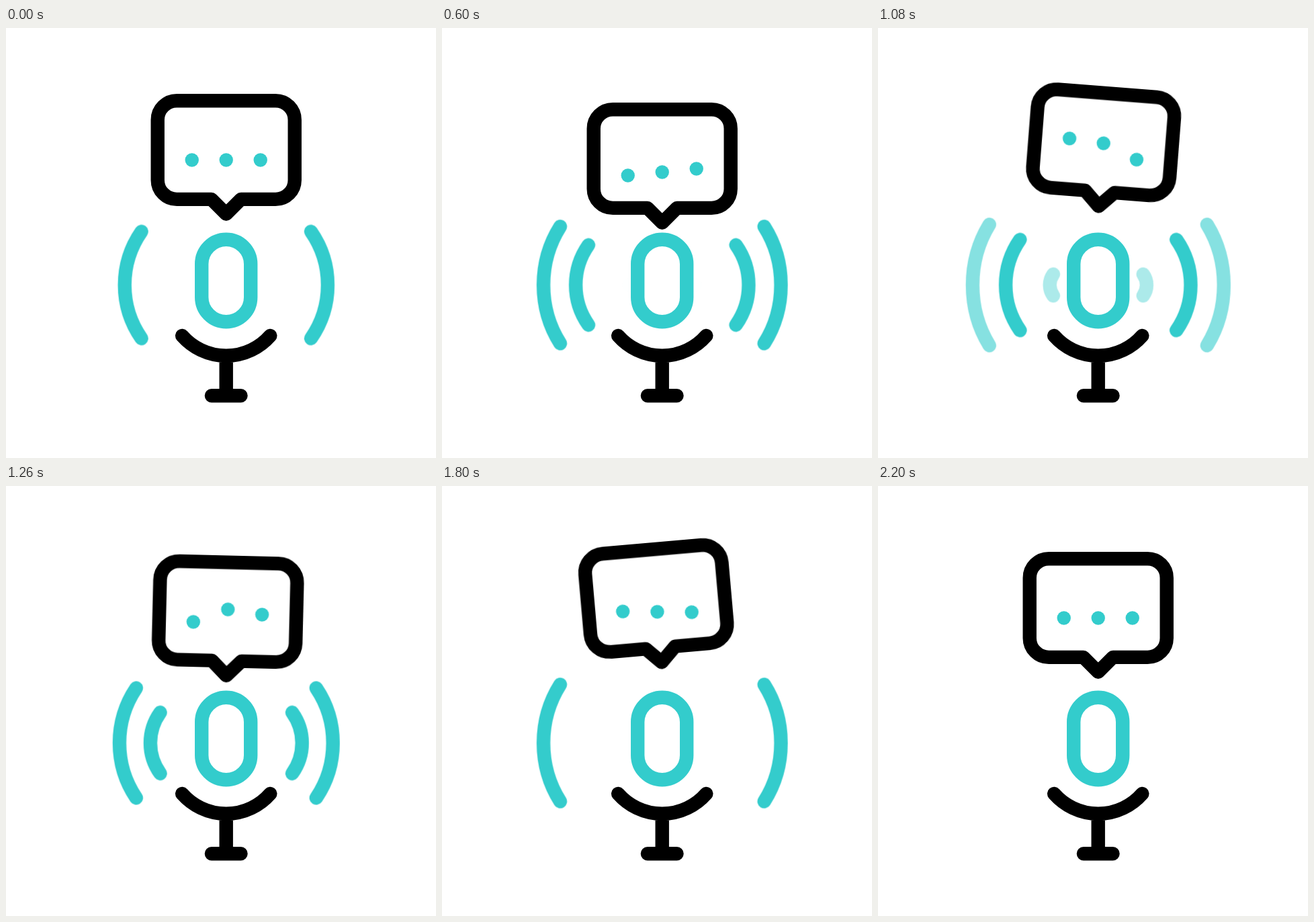
Recreate the animation shown at these times as an HTML page. Size 640x640 px, loop 2.4 s.

```html
<!DOCTYPE html>
<html lang="en">
<head>
<meta charset="utf-8">
<title>Voice message</title>
<style>
  html, body { margin: 0; width: 100%; height: 100%; overflow: hidden; background: #fff; }
  svg { display: block; width: 100%; height: 100%; }

  .line { fill: none; stroke: #000; stroke-width: 20.4; stroke-linecap: round; stroke-linejoin: round; }
  .teal { stroke: #3cc; }

  /* Each wave shape holds the right and the left arc. */
  .wave {
    --point: path("M49 0C49 0 49 0 49 0M-49 0C-49 0 -49 0 -49 0");
    --near: path("M93.2 -39.3C110.3 -15.7 110.3 15.7 93.2 39.3M-93.2 -39.3C-110.3 -15.7 -110.3 15.7 -93.2 39.3");
    --mid: path("M126.2 -79.5C159.4 -31.7 159.4 31.7 126.2 79.5M-126.2 -79.5C-159.4 -31.7 -159.4 31.7 -126.2 79.5");
    --far: path("M177.2 -94.5C210.4 -37.6 210.4 37.6 177.2 94.5M-177.2 -94.5C-210.4 -37.6 -210.4 37.6 -177.2 94.5");
    opacity: 0;
    animation: wave 2400ms linear var(--delay) infinite;
  }
  .first { animation: first 2400ms linear infinite; }

  .bubble, .dot {
    animation: bubble 2400ms cubic-bezier(.333, 0, .667, 1) var(--delay) infinite;
  }
  .bubble { transform-origin: 327.7px 285px; }
  .dot { fill: #3cc; animation-name: dot; }

  @keyframes wave {
    0% { d: var(--point); opacity: 0; }
    8.3333% { d: var(--near); opacity: 1; }
    25% { d: var(--mid); }
    33.3333% { opacity: 1; }
    41.6667%, 100% { d: var(--far); opacity: 0; }
  }
  @keyframes first {
    0%, 16.6667% { d: var(--mid); opacity: 1; }
    25% { opacity: 1; }
    33.3333%, 100% { d: var(--far); opacity: 0; }
  }
  @keyframes bubble {
    0%, 83.3333%, 100% { transform: translateY(0) rotate(0deg); }
    16.6667%, 50% { transform: translateY(13px) rotate(0deg); }
    33.3333% { transform: translateY(-14.5px) rotate(5deg); }
    66.6667% { transform: translateY(-14.5px) rotate(-5deg); }
  }
  @keyframes dot {
    0%, 66.6667%, 100% { transform: translateY(0); }
    16.6667%, 50% { transform: translateY(10px); }
    33.3333% { transform: translateY(-20px); }
  }
</style>
</head>
<body>
<svg viewBox="0 0 640 640">
  <g class="line teal" transform="translate(327.7 382.5)">
    <path class="wave first"/>
    <path class="wave" style="--delay: 200ms"/>
    <path class="wave" style="--delay: 600ms"/>
    <path class="wave" style="--delay: 1000ms"/>
  </g>

  <rect class="line teal" x="291.2" y="314.8" width="73" height="122.4" rx="36.5"/>
  <path class="line" d="M262.1 458A87.1 87.1 0 0 0 393.3 458M327.7 487.7V547.2M305.9 547.2H349.5"/>

  <g class="bubble" style="--delay: 200ms">
    <path class="line" d="M254.2 108.2H401.2A28.5 28.5 0 0 1 429.7 136.7V226.4A28.5 28.5 0 0 1 401.2 254.9H349.7L327.7 276.9L305.7 254.9H254.2A28.5 28.5 0 0 1 225.7 226.4V136.7A28.5 28.5 0 0 1 254.2 108.2Z"/>
    <circle class="dot" style="--delay: 200ms" cx="276.7" cy="196.5" r="10.2"/>
    <circle class="dot" style="--delay: 400ms" cx="327.7" cy="196.5" r="10.2"/>
    <circle class="dot" style="--delay: 600ms" cx="378.7" cy="196.5" r="10.2"/>
  </g>
</svg>
</body>
</html>
```
